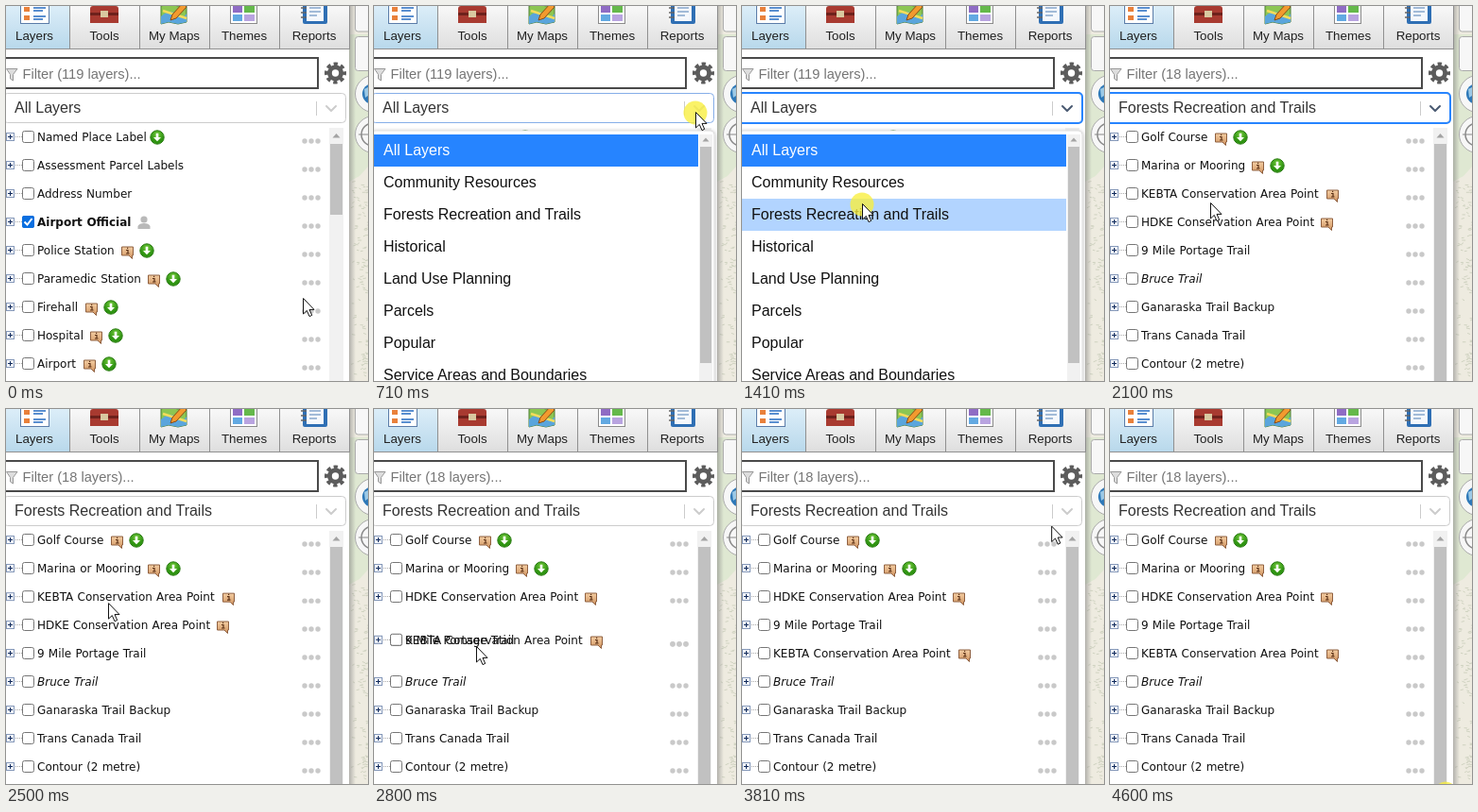
Recreate the animation shown at these times as an HTML page. Size 383 by 397 pixels, loop 4.76 s.

```html
<!DOCTYPE html>
<html lang="en">
<head>
<meta charset="utf-8">
<title>Layer list</title>
<style>
  html, body { margin: 0; width: 100%; height: 100%; overflow: hidden; background: #fff; }
  svg { display: block; width: 100%; height: 100%; }
  text { font: 16px "Liberation Sans", sans-serif; fill: #333; white-space: pre; }
  .tab { font-size: 13.33px; text-anchor: middle; fill: #222; }
  .row text { font: 12px "DejaVu Sans", sans-serif; word-spacing: .4px; fill: #111; }
  .row .bold { font-weight: bold; }
  .row .italic { font-style: italic; }
  #options text { fill: #111; }
  .crisp { shape-rendering: crispEdges; }
</style>
</head>
<body>
<svg viewBox="0 0 383 397">
  <defs>
    <linearGradient id="plain" x2="0" y2="1"><stop stop-color="#fbfbfb"/><stop offset="1" stop-color="#dedede"/></linearGradient>
    <linearGradient id="active" x2="0" y2="1"><stop stop-color="#e0f0fa"/><stop offset="1" stop-color="#b8d8eb"/></linearGradient>
    <linearGradient id="edge"><stop stop-color="#777" stop-opacity=".5"/><stop offset="1" stop-color="#777" stop-opacity="0"/></linearGradient>
    <linearGradient id="orange" x2="0" y2="1"><stop stop-color="#f3cda2"/><stop offset="1" stop-color="#d0935f"/></linearGradient>
    <radialGradient id="green" cy=".3"><stop stop-color="#72c93a"/><stop offset="1" stop-color="#2f9412"/></radialGradient>
    <filter id="shadow" x="-10%" width="120%" y="-5%" height="110%"><feDropShadow dx="0" dy="1" stdDeviation="2" flood-opacity=".3"/></filter>

    <g id="info" transform="translate(.5 .5)">
      <path d="M-6-4.500H6V4.500H5V8L1.500 4.500H-6Z" fill="url(#orange)" stroke="#8f6040"/>
      <path d="M-1.500-1H.5V2.500M-1.500 2.500H2M-.5-3.200H.7" fill="none" stroke="#5a3016" stroke-width="1.200"/>
    </g>
    <g id="download">
      <circle r="7.200" fill="url(#green)" stroke="#2c7d14"/>
      <path d="M-1.300-4.200H1.300V0H4L0 4.300L-4 0H-1.300Z" fill="#fff"/>
    </g>
    <g id="person" fill="#b9b9b9"><circle cy="-3" r="3.600"/><path d="M-6.500 7V4Q-5 1 0 1T6.500 4V7Z"/></g>
    <g id="rowBase">
      <rect x=".5" y="-4.500" width="8" height="8" fill="#f4f7fc" stroke="#8497b8"/>
      <path d="M2-.5H7M4.500-3V2" stroke="#102a5c"/>
      <path d="M10-.5H17" stroke="#aaa" stroke-dasharray="1"/>
      <rect x="17.500" y="-6.500" width="12" height="12" rx="2" fill="#fff" stroke="#767676"/>
      <g fill="#c9c9c9"><circle cx="316" cy="4" r="2.700"/><circle cx="323" cy="4" r="2.700"/><circle cx="330" cy="4" r="2.700"/></g>
    </g>
  </defs>

  <rect width="383" height="397" fill="#fff"/>

  <g id="map">
    <rect x="363" width="20" height="397" fill="#eeebe0"/>
    <path d="M363 30H383V170L374 180L363 186Z" fill="#dfe8d2"/>
    <path id="marsh" stroke="#d0d3c1" fill="none"/>
    <rect x="363" width="7" height="397" fill="url(#edge)"/>
    <g fill="#f7f7f7" stroke="#aaa">
      <rect x="369.500" y="-8" width="30" height="35" rx="3"/>
      <rect x="369.500" y="32.500" width="30" height="36" rx="3"/>
      <circle cx="389" cy="93" r="19.500"/><circle cx="389" cy="136" r="19.500"/>
    </g>
    <circle cx="388" cy="93" r="11" fill="#2d78b8"/>
    <path d="M379 88L383 86V95L380 97Z" fill="#9cc9e6"/>
    <circle cx="388" cy="136" r="12" fill="none" stroke="#888" stroke-width="1.500"/>
    <path d="M373 136H383" stroke="#888"/>
  </g>

  <g id="tabs"></g>
  <g id="tabIcons">
    <g class="crisp">
      <rect x="15.500" y="-8.500" width="30" height="27" fill="#fff" stroke="#5b7ca8"/>
      <path d="M19 1H25V6H19ZM19 10H25V15H19Z" fill="#e9803a"/>
      <path d="M29 2H42M29 5H39M29 11H42M29 14H39" stroke="#5a8fd0" stroke-width="2"/>
    </g>
    <path d="M89 3Q89 0 92 0H116Q119 0 119 3V18H89Z" fill="#a83a30"/>
    <path d="M89 7H119V10H89Z" fill="#6e211c"/><rect x="100" y="5" width="8" height="7" fill="#d9c9a0"/>
    <path d="M164 0L172-2L182 0L191-2V17L182 19L172 17L164 19Z" fill="#8cc653" stroke="#4d7e36"/>
    <path d="M164 11Q174 2 180 9T191 8V17L182 19L172 17L164 19Z" fill="#5aa5dc"/>
    <path d="M166 5L191 13" stroke="#f4dc5a" stroke-width="2.500"/>
    <path d="M174 15L176 9L187-3L191 1L180 13Z" fill="#f29a2e" stroke="#8a4b16"/>
    <g class="crisp">
      <rect x="237.500" y="-8.500" width="28" height="27" fill="#fff" stroke="#8a8a8a"/>
      <path d="M240 0H250V7H240Z" fill="#8f6cc4"/><path d="M252 0H263V7H252Z" fill="#65b94b"/>
      <path d="M240 9H250V16H240Z" fill="#62a9e2"/><path d="M252 9H263V16H252Z" fill="#b9a4e0"/>
    </g>
    <rect x="314" y="-6" width="26" height="25" rx="2" fill="#2f6fb4"/>
    <rect x="318" y="-6" width="18" height="22" fill="#f5f8fc"/>
    <path d="M321 2H333M321 6H333M321 10H329" stroke="#86a7cc" stroke-width="1.500"/>
    <path d="M312 2H318M312 7H318M312 12H318" stroke="#666" stroke-width="1.500"/>
  </g>

  <rect x="-5" y="55" width="335" height="32" fill="#fff" stroke="#4a4a4a" stroke-width="2"/>
  <path d="M.5 66.500H12L7.500 72.500V79L4.500 77V72.500Z" fill="#ddd" stroke="#999"/>
  <text id="filter" x="17.500" y="77" style="font-size:14.670px;fill:#757575"></text>
  <g transform="translate(348.500 71)">
    <circle r="8.500" fill="#5c5c5c"/>
    <circle r="9.500" fill="none" stroke="#5c5c5c" stroke-width="4" stroke-dasharray="4.200 3.261" stroke-dashoffset="2.100"/>
    <circle r="3.700" fill="#fff"/>
  </g>

  <g id="allRows"></g>
  <g id="forestRows"></g>

  <g class="crisp">
    <rect x="342" y="129" width="15" height="268" fill="#f1f1f1"/>
    <rect id="thumb" x="343" y="146" width="13" fill="#c1c1c1"/>
  </g>
  <path d="M345.500 139.500L349.500 135L353.500 139.500Z" fill="#a3a3a3"/>

  <rect id="select" x="-2.500" y="92.500" width="362" height="31" rx="4" fill="#fff"/>
  <rect id="focus" x="-3" y="92" width="363" height="32" rx="4" fill="none" stroke="#2684ff" stroke-width="2"/>
  <text id="chosen" x="9" y="113"></text>
  <path d="M328.500 101V116" stroke="#ccc" class="crisp"/>
  <path id="chevron" d="M339 106L344 111L349 106" fill="none" stroke-width="2" stroke-linecap="round" stroke-linejoin="round"/>

  <g id="menu">
    <rect x="-3" y="132" width="363" height="280" rx="4" fill="#fff" stroke="#ddd" filter="url(#shadow)"/>
    <g id="options"></g>
    <rect x="344" y="136" width="14" height="261" fill="#f1f1f1"/>
    <rect x="345" y="149" width="12" height="229" fill="#c1c1c1"/>
    <path d="M347.500 143.500L351 139.500L354.500 143.500Z" fill="#a3a3a3"/>
  </g>

  <g id="pointer">
    <circle id="ring" cx="-1" cy="0" r="12.500" fill="#f8ee3c" fill-opacity=".78"/>
    <path transform="translate(-1 -1)" d="M.5.500V17L4.300 13.400L7 19.600L9.700 18.400L7 12.400H12Z" fill="#fff" stroke="#111"/>
  </g>
</svg>

<script>
const LOOP = 4760;
const OPEN = 620, PICK = 1570, BLUR = 2420;
const $ = id => document.getElementById(id);
const show = (id, on) => $(id).style.display = on ? '' : 'none';

const between = (t, from, to) => t >= from && t < to;

// Linear interpolation through [time, ...values] keys.
function track(keys, t) {
  const next = keys.findIndex(key => key[0] > t);
  if (next === 0) return keys[0].slice(1);
  if (next < 0) return keys.at(-1).slice(1);
  const a = keys[next - 1], b = keys[next];
  const p = (t - a[0]) / (b[0] - a[0]);
  return a.slice(1).map((v, i) => v + (b[i + 1] - v) * p);
}

const rowY = i => 139 + 30 * i;

// Label, x of the first icon, icons, text style
const allLayers = [
  ['Named Place Label', 160, ['download']],
  ['Assessment Parcel Labels'],
  ['Address Number'],
  ['Airport Official', 146, ['person'], 'bold'],
  ['Police Station', 128, ['info', 'download']],
  ['Paramedic Station', 156, ['info', 'download']],
  ['Firehall', 90, ['info', 'download']],
  ['Hospital', 95, ['info', 'download']],
  ['Airport', 88, ['info', 'download']]
];
const forestLayers = [
  ['Golf Course', 117, ['info', 'download']],
  ['Marina or Mooring', 156, ['info', 'download']],
  ['KEBTA Conservation Area Point', 235, ['info']],
  ['HDKE Conservation Area Point', 229, ['info']],
  ['9 Mile Portage Trail'],
  ['Bruce Trail', 0, [], 'italic'],
  ['Ganaraska Trail Backup'],
  ['Trans Canada Trail'],
  ['Contour (2 metre)']
];
const options = ['All Layers', 'Community Resources', 'Forests Recreation and Trails', 'Historical',
  'Land Use Planning', 'Parcels', 'Popular', 'Service Areas and Boundaries'];

function rowMarkup([label, iconX, icons = [], style = ''], i) {
  const check = style === 'bold'
    ? '<rect x="17" y="-7" width="13" height="13" rx="2" fill="#0b6fe0"/><path d="M19.500-.5L22.500 2.500L27.500-4" fill="none" stroke="#fff" stroke-width="2"/>'
    : '';
  const marks = icons.map((icon, n) => `<use href="#${icon}" x="${iconX + 21 * n}"/>`).join('');
  return `<g class="row" transform="translate(0 ${rowY(i)})"><use href="#rowBase"/>${check}
    <text x="33" y="4" class="${style}">${label}</text>${marks}</g>`;
}

$('allRows').innerHTML = allLayers.map(rowMarkup).join('');
$('forestRows').innerHTML = forestLayers.map(rowMarkup).join('');
$('options').innerHTML = options.map((label, i) =>
  `<rect y="${136 + 34 * i}" width="343" height="34"/><text x="10" y="${158 + 34 * i}">${label}</text>`).join('');
$('options').querySelector('text').style.fill = '#fff';
$('tabs').innerHTML = ['Layers', 'Tools', 'My Maps', 'Themes', 'Reports'].map((label, i) => {
  const x = 74 * i - 7;
  return `<rect x="${x + .5}" y="-5.500" width="74" height="51" fill="url(#${i ? 'plain' : 'active'})" stroke="#909090"/>
    <text class="tab" x="${x + 37}" y="36">${label}</text>`;
}).join('');

let seed = 7;
const random = () => (seed = seed * 16807 % 2147483647) / 2147483647;
$('marsh').setAttribute('d', Array.from({ length: 110 }, () =>
  `M${365 + random() * 17} ${186 + random() * 210}l${2 + random() * 2} ${random() * 3 - 1.5}`).join(''));

const pointerKeys = [
  [70, 315, 310], [390, 341, 113], [790, 341, 113], [1030, 155, 178], [1250, 128, 210],
  [1950, 128, 210], [2100, 107, 209], [2420, 109, 206], [2500, 109, 206], [2800, 109, 252],
  [3280, 109, 252], [3440, 180, 310], [3580, 275, 290], [3740, 326, 136], [3810, 328, 124],
  [4050, 366, 270], [4280, 362, 402], [4600, 356, 407]
];
const rowKeys = {
  2: [[2500, 199], [2800, 245], [2880, 245], [2960, 259]],
  3: [[2600, 229], [2720, 199]],
  4: [[2725, 259], [2885, 229]]
};

function draw(t) {
  const picked = t >= PICK;
  const focused = between(t, 790, BLUR);
  const [x, y] = track(pointerKeys, t);

  $('filter').textContent = `Filter (${picked ? 18 : 119} layers)...`;
  $('chosen').textContent = options[picked ? 2 : 0];
  show('allRows', !picked);
  show('forestRows', picked);
  $('thumb').setAttribute('height', picked ? 251 : 75);

  const border = between(t, OPEN, 790) ? '#86aee8' : between(t, 390, OPEN) ? '#b3b3b3' : '#ccc';
  $('select').setAttribute('stroke', border);
  show('focus', focused);
  $('chevron').setAttribute('stroke', focused ? '#4a5a72' : '#ccc');

  show('menu', between(t, OPEN, PICK));
  const hovered = t > 790 ? Math.floor((y - 136) / 34) : 0;
  const hoverFill = t >= 1410 ? '#b2d4ff' : '#deebff';
  $('options').querySelectorAll('rect').forEach((rect, i) =>
    rect.setAttribute('fill', i === 0 ? '#2684ff' : i === hovered ? hoverFill : '#fff'));

  for (const [i, keys] of Object.entries(rowKeys))
    $('forestRows').children[i].setAttribute('transform', `translate(0 ${track(keys, t)[0]})`);

  $('pointer').setAttribute('transform', `translate(${x} ${y})`);
  show('ring', between(t, 540, 870) || between(t, 1410, PICK) || t >= 4600);
}

const start = performance.now();
function tick() {
  draw((performance.now() - start) % LOOP);
  requestAnimationFrame(tick);
}
tick();
</script>
</body>
</html>
```
